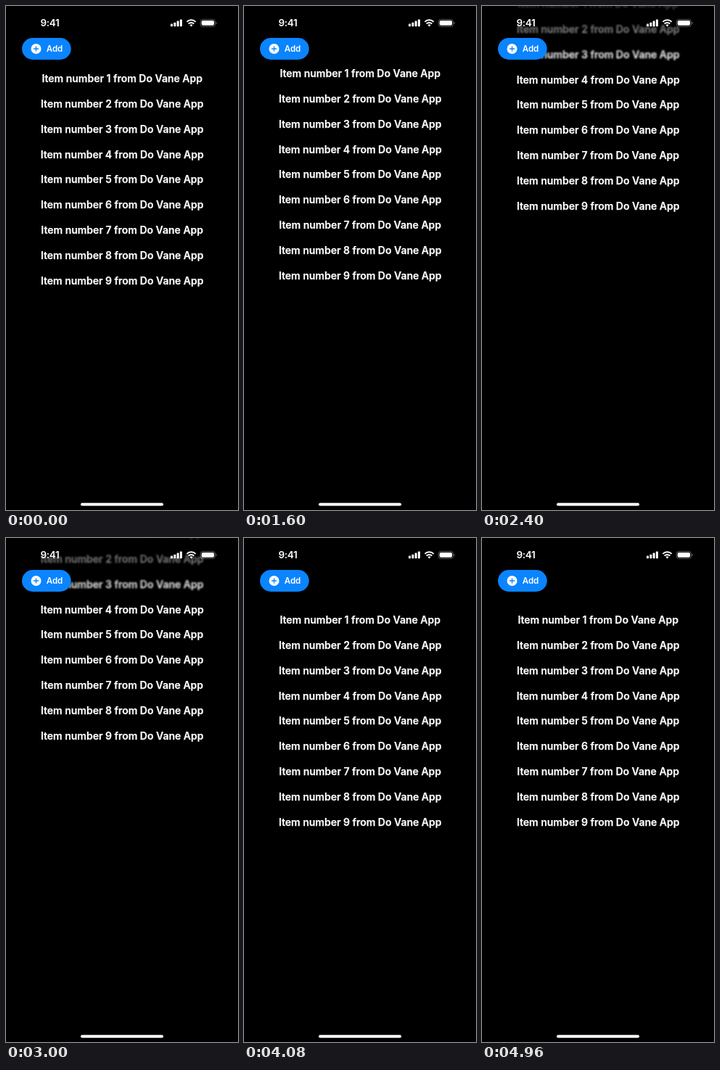
Animation of 320 by 695 pixels, one loop 5000 ms. Source, as an HTML page:

```html
<!DOCTYPE html>
<html lang="en">
<head>
<meta charset="utf-8">
<title>Item list</title>
<style>
  html, body { margin: 0; width: 100%; height: 100%; overflow: hidden; background: #000; }
  body { position: relative; color: #fff; font-family: Inter, Roboto, sans-serif; font-weight: 600; }
  .layer, svg { position: absolute; left: 0; top: 0; width: 320px; height: 695px; overflow: hidden; }
  .sharp { -webkit-mask-image: linear-gradient(transparent 74px, #000 81px);
           mask-image: linear-gradient(transparent 74px, #000 81px); }
  .soft {
    --fade: linear-gradient(rgba(0,0,0,.22) 0, rgba(0,0,0,.46) 32px, rgba(0,0,0,.88) 66px, #000 74px, transparent 81px);
    -webkit-mask-image: var(--fade);
    mask-image: var(--fade);
  }
  .soft .blur { position: absolute; inset: 0; filter: blur(1.3px); }
  ul {
    position: absolute; left: 0; top: 82.9px; width: 320.4px; margin: 0; padding: 0;
    list-style: none; text-align: center; font-size: 14px; line-height: 34.875px; white-space: nowrap;
    -webkit-text-stroke: .25px #fff;
  }
  text { fill: #fff; font-family: Inter, Roboto, sans-serif; font-weight: 600; }
</style>
</head>
<body>
<div class="layer sharp"><ul></ul></div>
<div class="layer soft"><div class="blur"><ul></ul></div></div>

<svg viewBox="0 0 320 695" fill="#fff">
  <text x="47.5" y="28.3" font-size="13.5" letter-spacing="-.3">9:41</text>

  <rect x="227" y="24.4" width="3" height="3.9" rx=".8"/>
  <rect x="231.3" y="22.7" width="3" height="5.6" rx=".8"/>
  <rect x="235.6" y="20.6" width="3" height="7.7" rx=".8"/>
  <rect x="239.9" y="18.4" width="3" height="9.9" rx=".8"/>

  <g fill="none" stroke="#fff" stroke-width="2">
    <path d="M249.4 21.9a8.6 8.6 0 0 1 12.2 0"/>
    <path d="M251.7 24.5a5.4 5.4 0 0 1 7.6 0"/>
  </g>
  <path d="M255.5 28.4l-2-2.1a2.9 2.9 0 0 1 4 0z"/>

  <rect x="268.2" y="18.5" width="20.4" height="9.8" rx="3.4" fill="none" stroke="#fff" stroke-opacity=".4" stroke-width=".9"/>
  <rect x="269.7" y="20" width="17.4" height="6.8" rx="2.1"/>
  <path d="M289.7 21.7a1.9 1.9 0 0 1 0 3.4z" opacity=".45"/>

  <rect x="22" y="44" width="67.7" height="30" rx="15" fill="#0a84ff"/>
  <circle cx="41.5" cy="59" r="7"/>
  <path d="M38.4 59h6.2M41.5 55.9v6.2" stroke="#0a84ff" stroke-width="1.3" stroke-linecap="round"/>
  <text x="55.7" y="63.1" font-size="11.5">Add</text>

  <rect x="103" y="685.2" width="114" height="4" rx="2"/>
</svg>

<script>
  const LOOP = 5000, STEP = 40, START = 1600;

  // Scroll path: [time in ms, vertical offset in px]
  const path = [
    [1600, -7], [1760, -38], [1920, -66], [2120, -91], [2240, -98], [2400, -103],
    [2600, -106.5], [2800, -108], [3000, -106], [3120, -97], [3240, -79],
    [3360, -59], [3600, -28], [3800, -5], [3920, 3], [4080, 12.5], [4320, 29],
    [4440, 29], [4560, 34], [4640, 33], [4800, 24.5], [4960, 12.5]
  ];

  const slope = (a, b) => (b[1] - a[1]) / (b[0] - a[0]);

  // Tangents are flat at turning points so the curve never overshoots.
  const tangents = path.map((p, i) => {
    if (!i) return slope(p, path[1]);
    if (i === path.length - 1) return slope(path[i - 1], p);
    const before = slope(path[i - 1], p), after = slope(p, path[i + 1]);
    return before * after <= 0 ? 0 : 2 * before * after / (before + after);
  });

  function offsetAt(time) {
    if (time < START) return 0;
    const i = path.findIndex(p => p[0] > time) - 1;
    if (i < 0) return path[path.length - 1][1];
    const [t0, y0] = path[i], [t1, y1] = path[i + 1];
    const span = t1 - t0, u = (time - t0) / span, v = 1 - u;
    return v * v * (1 + 2 * u) * y0 + u * u * (3 - 2 * u) * y1
      + span * u * v * (v * tangents[i] - u * tangents[i + 1]);
  }

  const lists = document.querySelectorAll('ul');
  const items = Array.from({ length: 9 }, (_, i) => `<li>Item number ${i + 1} from Do Vane App</li>`).join('');
  lists.forEach(list => { list.innerHTML = items; });

  function draw() {
    const time = Math.floor(performance.now() % LOOP / STEP) * STEP;
    const shift = `translateY(${offsetAt(time).toFixed(2)}px)`;
    lists.forEach(list => { list.style.transform = shift; });
    requestAnimationFrame(draw);
  }
  draw();
</script>
</body>
</html>
```
